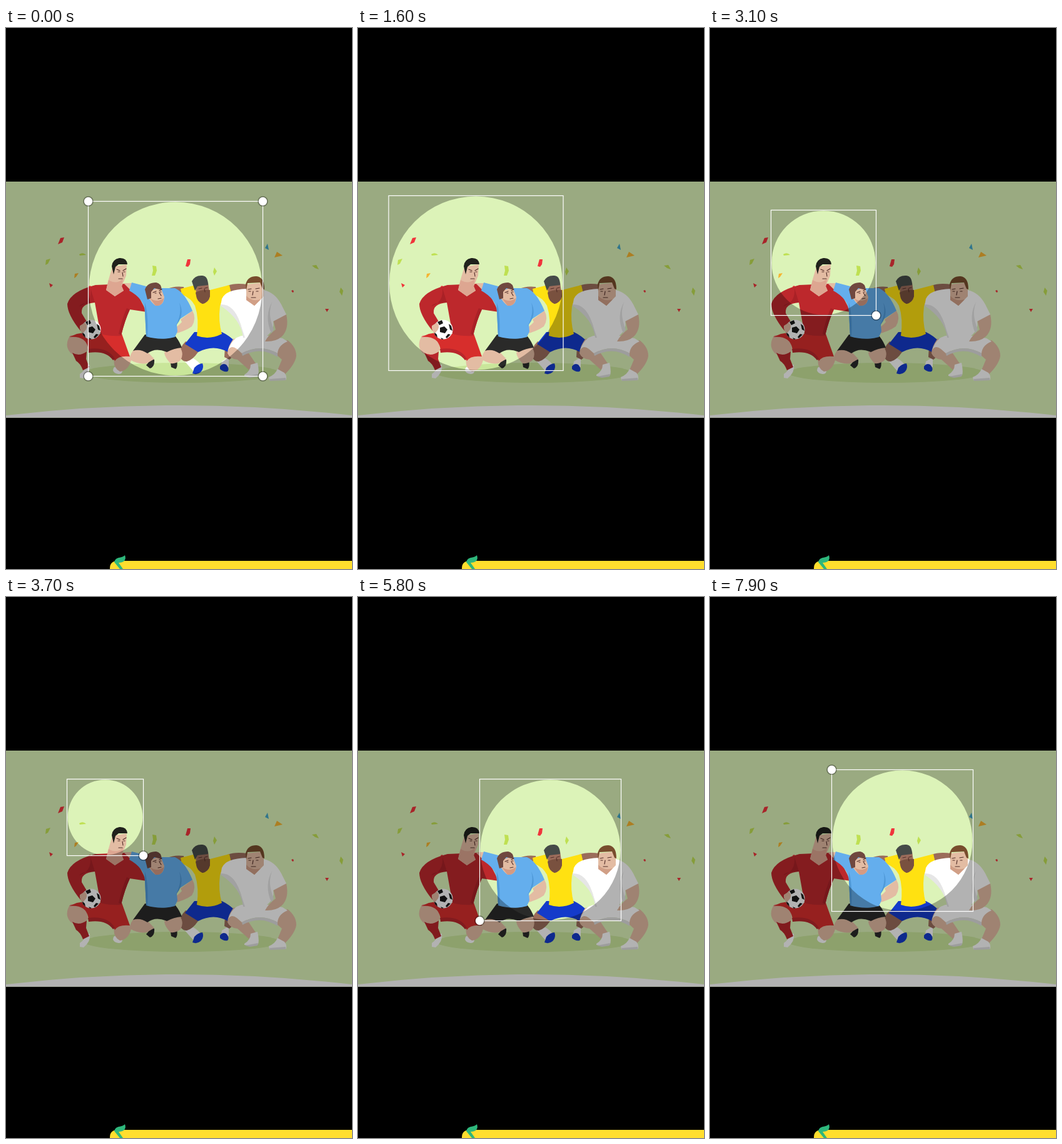
Write an HTML page that moves like this. It is 553x863 px and loops after 8000 ms.

```html
<!DOCTYPE html>
<html lang="en">
<head>
<meta charset="utf-8">
<title>Crop tool</title>
<style>
  html, body { margin: 0; width: 100%; height: 100%; overflow: hidden; background: #000; }
  svg { display: block; width: 100vw; height: 100vh; }
  .fair { fill: #e3bca3; }
  .brown { fill: #9b6c5b; }
  .line { fill: none; stroke: #54302a; stroke-width: 1.2; stroke-linecap: round; }
</style>
</head>
<body>
<svg viewBox="0 0 553 863">
  <rect width="553" height="863"/>
  <rect y="245" width="553" height="376.5" fill="#dcf3b8"/>
  <path d="M0 621.500V618Q276 586 553 618V621.500Z" fill="#fff"/>
  <ellipse cx="281" cy="550" rx="157" ry="16" fill="#c9e69a"/>
  <g id="confetti"></g>

  <g id="yellow-player">
    <path class="brown" d="M256 417Q268 411 284 413L286 423 272 420ZM354 411Q366 406 386 409L384 421 356 426Z"/>
    <path fill="#fff" d="M285 531L296 525Q311 533 314 542L300 548ZM345 532L356 525 356 541 344 538Z"/>
    <path class="brown" d="M287 500Q275 512 278 524 282 533 289 532 298 530 307 517L306 506ZM350 509L367 503Q372 518 357 529L349 525Z"/>
    <path fill="#143bca" d="M301 485L345 485Q358 491 368 502L355 517Q332 504 307 517L286 504Z
      M301 542Q306 536 314 535 317 543 311 549 305 554 298 551ZM342 540Q346 534 352 537 358 544 354 548 347 549 342 544Z"/>
    <path fill="#ffe111" d="M279 416L303 410 326 418 357 410 360 423Q346 428 342 444 339 468 345 488 325 498 305 491 309 464 302 443 296 431 281 425Z"/>
    <path class="brown" d="M303 411L323 406 326 428Q324 438 314 440 305 436 304 426Z"/>
    <path fill="#79513f" d="M303 422Q312 417 326 418L326 428Q323 438 314 440 305 436 304 427Z"/>
    <path fill="#454a48" d="M297 404Q302 394 314 395 323 396 323 410L306 412 302 419Z"/>
    <path class="line" d="M308 416l5-1m5 0l4-1m-5 2l1 5"/>
  </g>

  <g id="white-player">
    <path class="fair" d="M364 495Q354 509 354 519 358 528 370 529L388 545 401 538 384 513ZM433 503L450 498Q464 509 464 523 462 537 444 554L433 548 441 529 430 519Z"/>
    <path fill="#fff" d="M376 491L418 491 442 495 450 500Q435 506 434 519 406 503 377 519L369 512Q360 505 355 514 361 495 376 491Z
      M381 553Q391 547 391 537L402 534Q405 547 403 554 394 558 381 555ZM420 557Q430 553 434 544L445 550Q450 556 447 562L421 562Z"/>
    <path fill="#e0e0e0" d="M377 519Q406 503 434 519L434 525Q407 507 378 523ZM382 556L403 552 402 556 390 558ZM421 560L447 558 447 562 422 563Z"/>
    <path class="fair" d="M426 462L448 457Q453 480 441 492 431 501 414 500 419 490 431 481Z"/>
    <path fill="#fff" d="M345 432Q351 417 385 416L412 418Q430 422 440 441L448 457 427 468Q430 481 416 492 397 499 379 494 378 472 365 453 354 441 343 443Z"/>
    <path fill="#e6e6e6" d="M343 441Q364 440 374 470L382 494 379 494Q376 465 343 443ZM426 436Q417 455 428 481L424 487Q412 459 426 436Z"/>
    <path class="fair" d="M384 409L412 406 412 428 397 443 384 433Z"/>
    <path fill="#d19f86" d="M384 427Q392 437 407 433L397 443 384 434Z"/>
    <path fill="#784d2d" d="M383 409Q386 396 400 396 413 397 413 417L410 416 406 406 386 407 384 419Z"/>
    <path class="line" d="M387 417l5-1m7 0l6-1m-17 5h3m9 0h3m-8 0l-1 6m-2 4h7"/>
  </g>

  <g id="red-player">
    <path fill="#fff" d="M118 552Q127 546 126 538L134 537Q136 549 124 559L118 558ZM172 542L181 536 186 547Q186 552 180 552 172 551 171 546Z"/>
    <path class="fair" d="M103 490Q94 503 100 514 106 525 121 521L131 514 128 490ZM173 524Q170 542 182 548 195 547 200 530L194 514Z"/>
    <path fill="#b9262b" d="M106 518Q117 525 129 516L128 528 133 541 123 546Q119 535 112 531Z"/>
    <path fill="#d72e2c" d="M113 488Q134 483 152 488L184 485 198 524Q180 522 174 531 163 511 132 515 130 490 101 493Z"/>
    <path fill="#b9262b" d="M131 512Q163 508 174 528L171 530Q160 514 132 518Z"/>
    <path fill="#bd282c" d="M143 410L191 408Q207 411 211 426L225 453 198 449Q190 466 184 491 166 492 151 488L142 438Q119 440 121 455L130 470 119 483Q98 457 98 440 104 420 143 410Z"/>
    <path fill="#a92126" d="M135 415Q137 438 117 444 121 437 142 438ZM198 449Q190 466 184 490L180 488Q186 462 193 447Z"/>
    <path class="fair" d="M170 381L193 377 192 395 185 412 188 419 174 428 160 418 164 401Z"/>
    <path fill="#dda691" d="M164 402Q177 410 187 400L185 412 188 419 174 428 160 418Z"/>
    <path fill="#20211c" d="M169 380Q170 369 181 367 193 366 194 377L180 377 175 381 172 393Z"/>
    <path class="line" stroke="#20211c" d="M177 385l5 2m5 0l5-3m-13 5h3m6 0h2m-4 1l1 6m-7 4h6"/>
    <circle cx="136" cy="481" r="15.500" fill="#fff"/>
    <path fill="#181818" d="M131 478l7-2 5 5-4 6-8-2ZM127 469l7-3 2 5-6 3ZM145 472l4 3 2 8-4-2ZM144 488l4 1-6 6-2-2ZM121 484l5 5 1 5-4-4ZM132 494l5 2-3 1Z"/>
    <path class="fair" d="M118 475L126 470Q131 474 128 481L123 487Q117 483 118 475Z"/>
  </g>

  <g id="blue-player">
    <path fill="#2a2a29" d="M224 538Q229 533 230 527L237 529Q238 541 230 543ZM263 534L273 529Q275 541 271 544L264 541Z"/>
    <path class="fair" d="M188 407L204 407 200 419ZM206 511Q197 521 198 529 211 537 225 535L237 528 224 514ZM256 513L278 509Q285 520 279 530 272 536 263 535 254 526 253 518Z"/>
    <path fill="#2a2a29" d="M222 489L271 492Q278 501 281 510 268 511 257 517 239 509 226 519 214 511 203 515Z"/>
    <path class="fair" d="M279 465L298 451Q305 463 297 476 286 484 266 489L260 485Q273 478 281 469Z"/>
    <path fill="#64aeed" d="M201 406L224 412 250 415 270 415Q286 422 298 451L277 465 273 473 274 484 270 493Q248 499 224 492L222 453Q221 432 197 419Z"/>
    <path fill="#4f99d8" d="M222 438Q228 458 226 492L224 492 222 453ZM277 438Q286 457 273 473L271 476Q282 455 277 438Z"/>
    <path class="fair" d="M228 420L247 413 253 429Q252 444 239 443 232 438 228 430Z"/>
    <path fill="#d59b83" d="M230 431Q242 439 252 431 251 444 239 443Z"/>
    <path fill="#70483f" d="M222 417Q226 406 240 406 248 407 249 418L237 415 232 421 232 431 226 433Z"/>
    <path class="line" d="M235 422l5-2m5-1l4-2m-11 6h2m6-2h2m-3 1l3 5m-5 5l5-1"/>
  </g>

  <path id="shade" fill="#000" fill-opacity=".3" fill-rule="evenodd"/>
  <rect id="frame" fill="none" stroke="#fff" stroke-width="1.200"/>
  <g id="handles"></g>

  <path d="M166 863V862Q166 850 179 850H553V863Z" fill="#ffde2e"/>
  <path d="M173 852C176 842 184 847 190 841C193 849 188 853 180 853L187 863H182Z" fill="#2eb77c"/>
</svg>
<script>
const $ = id => document.getElementById(id);
const add = (parent, tag, attrs) => {
  const el = document.createElementNS('http://www.w3.org/2000/svg', tag);
  set(el, attrs);
  return parent.appendChild(el);
};
const set = (el, attrs) => {
  for (const key in attrs) el.setAttribute(key, attrs[key]);
};

const red = '#f0343b', green = '#bfe052', orange = '#f6b431', blue = '#45a8c8';
const confetti = [
  [red, 'M87 335l6-1-3 8-7 3z'], [green, 'M64 370l7-2-4 8-4 2z'],
  [green, 'M117 361q6-4 11 1l-10 1z'], [orange, 'M110 392l6-1-4 6-3 2z'],
  [red, 'M69 407l6 3-4 4z'], [red, 'M132 412l3-1 1 3-2 1z'],
  [green, 'M234 379l6 1 1 7-3 8-5 0 2-8z'], [red, 'M290 369l5 0-1 8-3 4-4-1z'],
  [green, 'M333 382l4 6-4 7-2-6z'], [blue, 'M418 344l2 10-6-3z'],
  [orange, 'M433 357l9 6-13 3z'], [green, 'M489 379l7-1 4 7-6-2z'],
  [red, 'M456 419l3-1 1 3-2 1z'], [red, 'M510 448l6 0-3 5z'],
  [green, 'M535 414l4 5-2 8-4-6z']
];
for (const [fill, d] of confetti) add($('confetti'), 'path', { fill, d });

// Time, left, top and side of the crop square.
const keys = [
  [0, 131.5, 276.5, 279], [700, 131.5, 276.5, 279], [900, 40.5, 244.5, 279],
  [1000, 40.5, 244.5, 279], [1100, .5, 244.5, 279], [1300, .5, 244.5, 279],
  [1900, 97.5, 290.5, 279], [2800, 97.5, 290.5, 279], [3100, 97.5, 290.5, 168],
  [3500, 97.5, 290.5, 110], [3600, 97.5, 290.5, 110], [4100, 97.5, 290.5, 226],
  [4800, 97.5, 290.5, 226], [5100, 194.5, 290.5, 226], [5800, 194.5, 290.5, 226],
  [6300, 290.5, 290.5, 130], [6900, 210.5, 290.5, 210], [7800, 210.5, 290.5, 210],
  [7900, 194.5, 275.5, 226], [8000, 194.5, 275.5, 226]
];
// Corners are numbered clockwise from the top left.
const visibleCorners = [
  [0, '0123'], [600, ''], [2100, '0123'], [2800, '2'], [4300, '0123'],
  [4800, ''], [5200, '0123'], [5800, '3'], [7000, '0123'], [7800, '0']
];

const handles = [0, 1, 2, 3].map(() => {
  const g = add($('handles'), 'g', {});
  add(g, 'circle', { r: 8.6, 'fill-opacity': .16 });
  add(g, 'circle', { r: 7.7, 'fill-opacity': .3 });
  add(g, 'circle', { r: 6.7, fill: '#fff' });
  return g;
});

function cropAt(t) {
  const i = keys.findIndex(key => key[0] > t);
  const [from, to] = [keys[i - 1], keys[i]];
  const p = (t - from[0]) / (to[0] - from[0]);
  const eased = p * p * (3 - 2 * p);
  return [1, 2, 3].map(k => from[k] + (to[k] - from[k]) * eased);
}

function draw(now) {
  const t = Math.floor(now % 8000 / 100) * 100;
  const [x, y, side] = cropAt(t);
  const r = side / 2 - 1, cy = y + side / 2;
  set($('frame'), { x, y, width: side, height: side });
  set($('shade'), {
    d: `M0 245H553V621.5H0ZM${x + 1} ${cy}a${r} ${r} 0 1 1 ${2 * r} 0a${r} ${r} 0 1 1 ${-2 * r} 0Z`
  });
  const corners = visibleCorners.filter(([start]) => start <= t).pop()[1];
  handles.forEach((handle, i) => set(handle, {
    transform: `translate(${x + (i === 1 || i === 2 ? side : 0)} ${y + (i > 1 ? side : 0)})`,
    visibility: corners.includes(i) ? 'visible' : 'hidden'
  }));
}

const start = performance.now();
const tick = () => {
  draw(performance.now() - start);
  requestAnimationFrame(tick);
};
tick();
</script>
</body>
</html>
```
